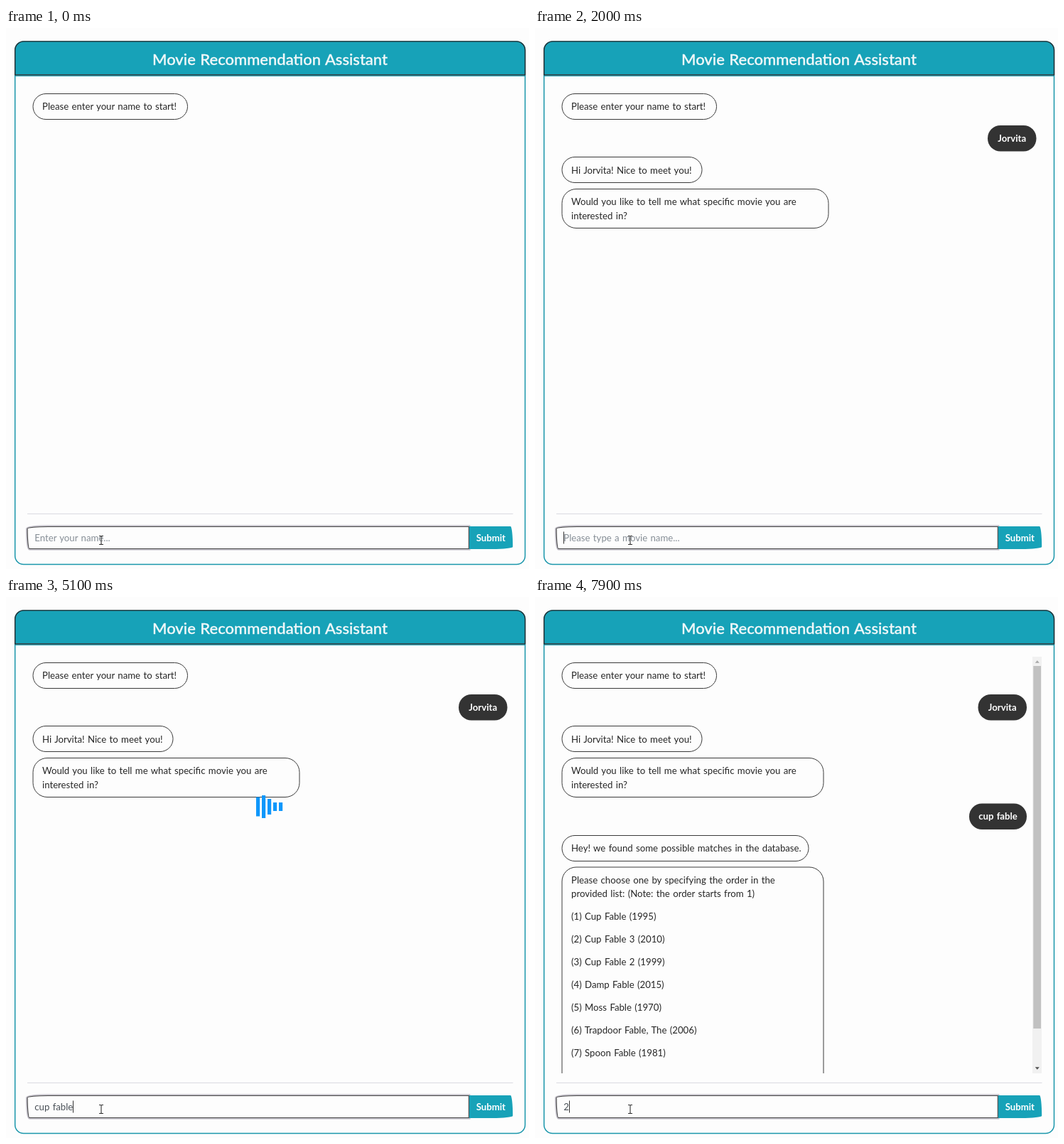
Recreate the animation shown at these times as an HTML page. Size 736 by 761 pixels, loop 8000 ms.

```html
<!DOCTYPE html>
<html lang="en">
<head>
<meta charset="utf-8">
<title>Movie Recommendation Assistant</title>
<style>
  html, body { margin: 0; width: 100%; height: 100%; overflow: hidden; background: #fdfdfd; }
  svg { display: block; width: 736px; height: 761px; }
  text { font: 13.2px Lato, "Open Sans", sans-serif; word-spacing: 1px; white-space: pre; fill: #262626; }
  .title { font-size: 22px; font-weight: 500; fill: #f2f8f9; stroke: #f2f8f9; stroke-width: .35; }
  .bold { font-weight: 700; fill: #fff; text-anchor: middle; }
  .bubble { fill: #fdfdfd; stroke: #3a3a3a; stroke-width: 1; }
  .user { fill: #333; }
</style>
</head>
<body>
<svg viewBox="0 0 736 761">
  <rect width="736" height="761" fill="#fdfdfd"/>
  <rect x="12.7" y="18.9" width="717.8" height="735.6" rx="12" fill="#fdfdfd" stroke="#1a96ab" stroke-width="1.5"/>
  <path d="M12.7 66V31.2a12.3 12.3 0 0 1 12.3-12.3H718.2a12.3 12.3 0 0 1 12.3 12.3V66Z" fill="#17a2b8" stroke="#262b2e" stroke-width="1.4"/>
  <path d="M12 67.4H731" stroke="#1a96ab" stroke-width="1.4"/>
  <text class="title" x="371.5" y="51.5" text-anchor="middle">Movie Recommendation Assistant</text>

  <clipPath id="view"><rect x="25" y="84" width="690" height="586"/></clipPath>
  <g id="chat" clip-path="url(#view)"></g>
  <g id="bars" fill="#0f97fb"></g>
  <g id="scroll">
    <rect x="700" y="84" width="13" height="586" fill="#f1f1f1"/>
    <rect id="thumb" x="701.3" y="97" width="10.7" fill="#c1c1c1"/>
    <path d="M703.8 92.7h6l-3-3.4z" fill="#a6a6a6"/>
    <path d="M703.8 661.3h6l-3 3.4z" fill="#505050"/>
  </g>

  <path d="M30 683.4H713.5" stroke="#d9d9e0"/>
  <defs>
    <path id="box" d="M651.3 701.5V732.5H33a2.9 28.2 0 0 1 -2.9 -28.2a29 2.8 0 0 1 29 -2.8Z"/>
  </defs>
  <use href="#box" fill="none" stroke="#c6c3cc" stroke-width="4.4"/>
  <path d="M651.5 701H710a3.2 28.8 0 0 1 3.2 28.8a28.8 3.2 0 0 1 -28.8 3.2H651.5Z" fill="#17a2b8"/>
  <use href="#box" fill="#fdfdfd" stroke="#444" stroke-width="1.1"/>
  <text class="bold" x="682.3" y="721.5">Submit</text>
  <text id="entry" x="40.3" y="721.5"></text>
  <rect id="caret" y="708.5" width="1" height="17" fill="#333"/>
  <path d="M131 714.5h2q1 0 1 1q0-1 1-1h2M134 715.5V725.5M131 726.5h2q1 0 1-1q0 1 1 1h2" fill="none" stroke="#333" stroke-width="1.1"/>
</svg>
<script>
const LOOP = 8000, STEP = 100;
const FIRST = 1900, SECOND = 5200;   // replies arrive
const name = "Jorvita", movie = "cup fable";
const $ = id => document.getElementById(id);

function add(parent, tag, attrs, text) {
  const el = document.createElementNS("http://www.w3.org/2000/svg", tag);
  for (const k in attrs) el.setAttribute(k, attrs[k]);
  if (text) el.textContent = text;
  return parent.appendChild(el);
}

const chat = $("chat"), first = add(chat, "g", {}), second = add(chat, "g", {});

function bot(parent, y, w, h, lines) {
  const box = add(parent, "rect", { class: "bubble", x: 38, y, width: w, height: h, rx: h > 40 ? 20 : 18 });
  lines.forEach(([dy, s]) => add(parent, "text", { x: 51, y: y + dy }, s));
  return box;
}

function user(parent, right, y, w, s) {
  const g = add(parent, "g", {});
  add(g, "rect", { class: "user", x: right - w, y, width: w, height: 36.5, rx: 18 });
  add(g, "text", { class: "bold", x: right - w / 2, y: y + 22.8 }, s);
  return g;
}

bot(chat, 92.5, 217.5, 36, [[22.7, "Please enter your name to start!"]]);
const nameTag = user(first, 705.5, 137, 68.5, name);
bot(first, 181.5, 197, 36, [[23, `Hi ${name}! Nice to meet you!`]]);
const question = bot(first, 226.5, 375, 55, [
  [22.7, "Would you like to tell me what specific movie you are"],
  [42.2, "interested in?"]
]);

const matches = [
  "Cup Fable (1995)", "Cup Fable 3 (2010)", "Cup Fable 2 (1999)", "Damp Fable (2015)",
  "Moss Fable (1970)", "Trapdoor Fable, The (2006)", "Spoon Fable (1981)"
];
user(second, 692, 290.5, 81, movie);
bot(second, 335.5, 347, 36, [[22.7, "Hey! we found some possible matches in the database."]]);
bot(second, 380, 368, 400, [
  [23, "Please choose one by specifying the order in the"],
  [42.3, "provided list: (Note: the order starts from 1)"],
  ...matches.map((m, i) => [74.3 + 32 * i, `(${i + 1}) ${m}`])
]);

const bars = Array.from({ length: 5 }, (_, i) => add($("bars"), "rect", { x: 352 + 8 * i, width: 5.2 }));

// Each input: when it opens, its hint, and the moment of every keystroke
const inputs = [
  { from: 0, hint: "Enter your name...", text: name, keys: [900, 1100, 1300, 1400, 1500, 1600, 1700] },
  { from: FIRST, hint: "Please type a movie name...", text: movie,
    keys: [3700, 3800, 3900, 4000, 4200, 4300, 4400, 4500, 4600] },
  { from: SECOND, hint: "Please enter the order of the movie you want...", text: "2", keys: [6300] }
];
const caretOff = [[0, 400], [2500, 3000], [3500, 3700], [5600, 6100], [6900, 7500]];
const loaders = [[1800, FIRST, 141.5], [4800, SECOND, 295]];
const within = (t, [a, b]) => t >= a && t < b;
const show = (el, on) => el.setAttribute("visibility", on ? "visible" : "hidden");

function barHeight(p) {
  p = p < 0 ? 0 : p % 1200;
  const k = p < 200 ? p / 200 : p < 500 ? (1 + Math.cos(Math.PI * (p - 200) / 300)) / 2 : 0;
  return 12 + 20 * k;
}

function draw(t) {
  const long = t >= SECOND;
  show(first, t >= FIRST);
  show(second, long);
  show($("scroll"), long);
  nameTag.setAttribute("transform", `translate(${long ? -13.5 : 0})`);
  question.setAttribute("width", long ? 368 : 375);
  $("thumb").setAttribute("height", t < 7000 ? 534 : 510);

  const load = loaders.find(l => within(t, l));
  show($("bars"), load);
  if (load) bars.forEach((bar, i) => {
    const h = barHeight(t - load[0] - 100 * i);
    bar.setAttribute("y", load[2] - h / 2);
    bar.setAttribute("height", h);
  });

  const input = inputs.filter(n => t >= n.from).pop();
  const typed = input.text.slice(0, input.keys.filter(k => t >= k).length);
  const entry = $("entry");
  entry.textContent = typed || input.hint;
  entry.style.fill = typed ? "#495057" : "#868e96";
  $("caret").setAttribute("x", typed ? Math.round(40.3 + entry.getComputedTextLength()) : 40);
  show($("caret"), !caretOff.some(r => within(t, r)));
}

const start = performance.now();
function tick() {
  const t = (performance.now() - start) % LOOP;
  draw(Math.floor(t / STEP) * STEP);
  requestAnimationFrame(tick);
}
tick();
</script>
</body>
</html>
```
